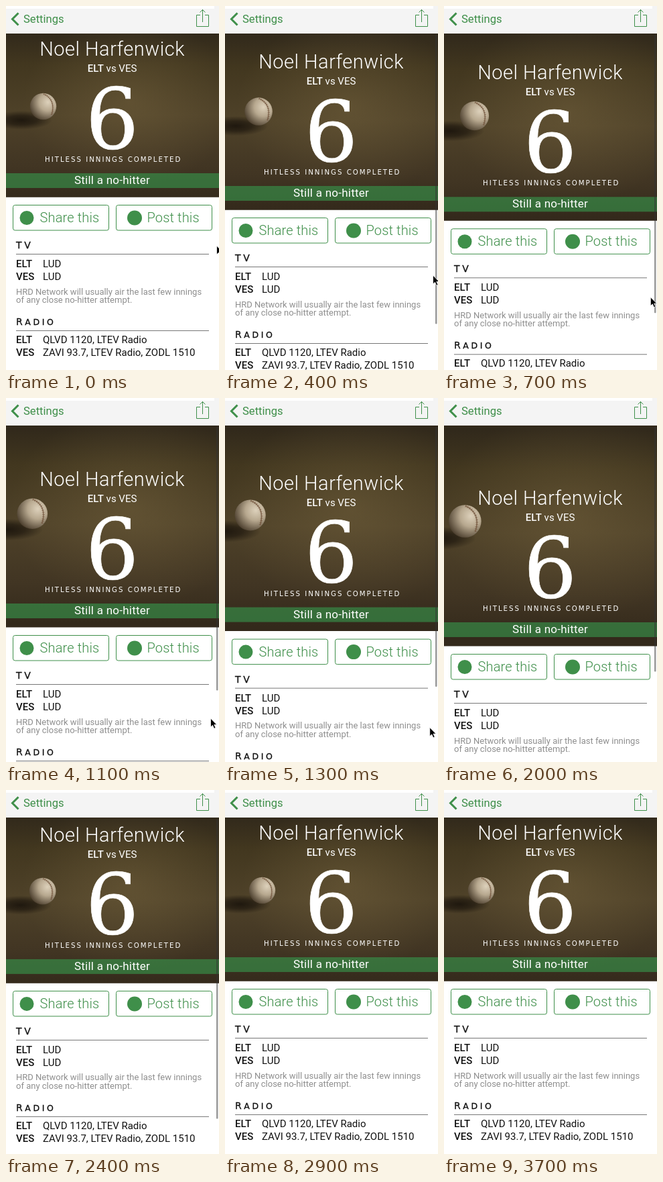
Write an HTML page that moves like this. It is 318 px wide and 542 px high and loops after 3.9 s.

```html
<!DOCTYPE html>
<html lang="en">
<head>
<meta charset="utf-8">
<title>No-hitter alert</title>
<style>
  html, body { margin: 0; width: 100%; height: 100%; overflow: hidden; background: #fff; }
  svg { display: block; width: 100%; height: 100%; }
  text { font-family: Roboto, "Open Sans", sans-serif; font-size: 15px; fill: #111; }
  .b { font-weight: 500; }
  .mid { text-anchor: middle; }
  .caps { font-family: "DejaVu Sans", sans-serif; font-size: 14px; letter-spacing: 3.6px; stroke: #111; stroke-width: .3; }
  .small { font-size: 12.5px; }
  .hero text { fill: #fff; }
  .hero .name { font-size: 29px; font-weight: 300; letter-spacing: .5px; }
  .hero .digit { font-family: "DejaVu Serif", serif; font-size: 125px; stroke: #fff; stroke-width: .7; }
  .hero .caps { font-size: 10.2px; letter-spacing: 2px; stroke: none; }
  .hero .state { font-size: 17px; letter-spacing: .25px; }
  .note { font-size: 13px; fill: #8e8e8e; }
  .link { font-size: 20px; font-weight: 300; letter-spacing: .15px; fill: #3f8f4a; }
  .back { font-size: 16.6px; fill: #3f8f4a; }
  .line { fill: none; stroke: #3f8f4a; }
</style>
</head>
<body>
<svg viewBox="0 0 318 542" preserveAspectRatio="none">
  <defs>
    <linearGradient id="ground" x1="0" y1="0" x2="0" y2="1">
      <stop offset="0" stop-color="#30281b"/>
      <stop offset=".2" stop-color="#42371f"/>
      <stop offset=".5" stop-color="#4f4229"/>
      <stop offset=".8" stop-color="#413523"/>
      <stop offset="1" stop-color="#33291b"/>
    </linearGradient>
    <radialGradient id="glow" cx=".58" cy=".42" r=".5">
      <stop offset="0" stop-color="#7d6a42" stop-opacity=".4"/>
      <stop offset="1" stop-color="#7d6a42" stop-opacity="0"/>
    </radialGradient>
    <radialGradient id="shade">
      <stop offset="0" stop-color="#17110a" stop-opacity=".85"/>
      <stop offset=".5" stop-color="#17110a" stop-opacity=".6"/>
      <stop offset="1" stop-color="#17110a" stop-opacity="0"/>
    </radialGradient>
    <radialGradient id="leather" cx=".68" cy=".34" r=".74">
      <stop offset="0" stop-color="#ddd1bb"/>
      <stop offset=".45" stop-color="#b7a88f"/>
      <stop offset="1" stop-color="#4c3f2e"/>
    </radialGradient>
    <clipPath id="window"><rect id="frame" y="41" width="318" height="243"/></clipPath>
  </defs>

  <rect width="318" height="542" fill="#fff"/>

  <g clip-path="url(#window)">
    <g id="photo">
      <rect y="4" width="318" height="364" fill="#33291b"/>
      <rect y="36" width="318" height="254" fill="url(#ground)"/>
      <rect y="36" width="318" height="254" fill="url(#glow)"/>
      <ellipse cx="23" cy="170" rx="46" ry="14" fill="url(#shade)"/>
      <circle cx="55.5" cy="149.5" r="19.7" fill="url(#leather)"/>
      <path d="M56 131C68 136 73 147 68 162" fill="none" stroke="#6f5038" stroke-width="1.3" opacity=".75"/>
      <path d="M56 131C68 136 73 147 68 162" fill="none" stroke="#6f5038" stroke-width="3.4"
            stroke-dasharray=".8 2" opacity=".5"/>
    </g>
  </g>

  <g id="content">
    <g class="hero">
      <text class="name mid" x="158.5" y="74">Noel Harfenwick</text>
      <text class="mid" x="158.5" y="98"><tspan class="b">ELT</tspan> vs VES</text>
      <text class="digit mid" x="158.5" y="211.5">6</text>
      <text class="caps" x="58" y="232">HITLESS INNINGS COMPLETED</text>
      <rect y="249" width="318" height="22" fill="#38914a" fill-opacity=".66"/>
      <text class="state mid" x="158.5" y="265">Still a no-hitter</text>
    </g>

    <rect class="line" x="10.5" y="296.5" width="143" height="37.5" rx="3"/>
    <rect class="line" x="164.5" y="296.5" width="143" height="37.5" rx="3"/>
    <circle cx="31" cy="315.5" r="10.5" fill="#3f8f4a"/>
    <circle cx="192" cy="315.5" r="11" fill="#3f8f4a"/>
    <text class="link" x="50.5" y="322">Share this</text>
    <text class="link" x="210.5" y="322">Post this</text>

    <text class="caps" x="15" y="361">TV</text>
    <rect x="15" y="369" width="288" height="1" fill="#777"/>
    <text class="b" x="15" y="389">ELT</text><text x="55" y="389">LUD</text>
    <text class="b" x="15" y="408">VES</text><text x="55" y="408">LUD</text>
    <text class="note" x="15" y="429.5">HRD Network will usually air the last few innings</text>
    <text class="note" x="15" y="442">of any close no-hitter attempt.</text>

    <text class="caps" x="15" y="475">R<tspan class="small">ADIO</tspan></text>
    <rect x="15" y="483" width="288" height="1" fill="#777"/>
    <text class="b" x="15" y="502">ELT</text><text x="55" y="502">QLVD 1120, LTEV Radio</text>
    <text class="b" x="15" y="521">VES</text><text x="55" y="521">ZAVI 93.7, LTEV Radio, ZODL 1510</text>
  </g>

  <rect width="318" height="41" fill="#f4f4f4"/>
  <rect width="311" height="4" fill="#fff"/>
  <path class="line" d="M18.5 10.5L9.5 19.5L18.5 28.5" stroke-width="3"/>
  <text class="back" x="26" y="25.2">Settings</text>
  <path class="line" d="M290 13.5H284.5V30.5H302.5V13.5H297M293.5 24V5.5M289.5 9.5L293.5 5.5L297.5 9.5"/>

  <rect id="bar" x="314" y="43" width="2.5" rx="1.2" fill="#333" fill-opacity=".5"/>
  <path id="cursor" d="M0 0V13L3 10.3L5.2 15.2L7.5 14.2L5.3 9.5H9.3Z" fill="#000" stroke="#fff" stroke-width=".8"/>
</svg>

<script>
  const LOOP = 3900, STEP = 100, LAST = 3700, RELEASE = 2000;
  const times = [0, 400, 1100, 1600, 2000];
  const pull = [0, 19, 57, 71, 85];
  const handX = [314.5, 310.5, 305.5, 306, 306];
  const handY = [357, 401, 477, 511, 546];
  const el = id => document.getElementById(id);
  const photo = el("photo"), frame = el("frame"), content = el("content");
  const bar = el("bar"), cursor = el("cursor");

  function along(values, t) {
    if (t >= RELEASE) return values[values.length - 1];
    const i = times.findIndex(k => k > t);
    const p = (t - times[i - 1]) / (times[i] - times[i - 1]);
    return values[i - 1] + (values[i] - values[i - 1]) * p;
  }

  // Finger drag, then a critically damped return.
  function offset(t) {
    if (t < RELEASE) return along(pull, t);
    const k = 0.013 * (t - RELEASE);
    const d = 85 * (1 + k) * Math.exp(-k);
    return d < 0.2 ? 0 : d;
  }

  function draw(t) {
    const d = offset(t), zoom = 1 + d / 364;
    content.setAttribute("transform", `translate(0 ${d})`);
    frame.setAttribute("height", 243.5 + d);
    photo.setAttribute("transform", `translate(159 4) scale(${zoom}) translate(-159 -4)`);
    bar.setAttribute("height", 449.5 - d);
    bar.setAttribute("opacity", t < STEP ? 0 : Math.max(0, Math.min(1, (2900 - t) / 300)));
    cursor.setAttribute("transform", `translate(${along(handX, t)} ${along(handY, t)})`);
  }

  const start = performance.now();
  function tick() {
    const t = (performance.now() - start) % LOOP;
    draw(Math.min(LAST, Math.floor(t / STEP) * STEP));
    requestAnimationFrame(tick);
  }
  tick();
</script>
</body>
</html>
```
